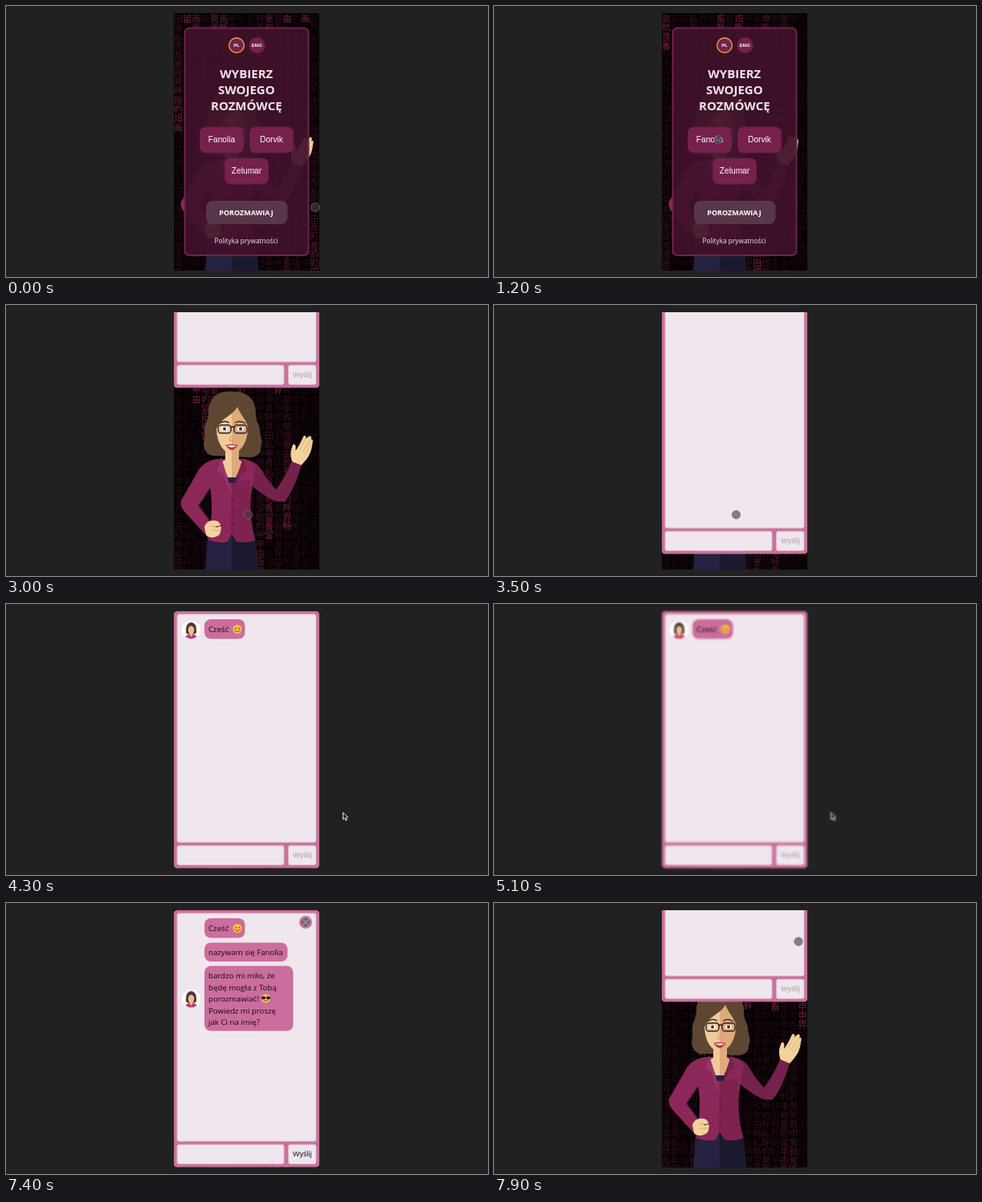
Recreate the animation shown at these times as an HTML page with a canvas. Size 600 by 338 pixels, loop 8000 ms.

```html
<!DOCTYPE html>
<html lang="pl">
<head>
<meta charset="utf-8">
<style>
  html, body { margin: 0; width: 100%; height: 100%; overflow: hidden; background: #222122; }
  canvas { display: block; width: 600px; height: 338px; }
</style>
</head>
<body>
<canvas id="stage"></canvas>
<script>
const LOOP = 8000, STEP = 100;
const canvas = document.getElementById('stage');
const c = canvas.getContext('2d');
const dpr = Math.max(1, window.devicePixelRatio || 1);
canvas.width = 600 * dpr;
canvas.height = 338 * dpr;

const COMIC = '"Open Sans", sans-serif';
const ARIAL = '"Liberation Sans", Arial, sans-serif';
const NAMES = ['Fanolia', 'Dorvik', 'Zelumar'];
const GLYPHS = [...'田由甲申电男甸町画畀畃畅畆畈畉畋界畍畎畏畑畔留畜畝畢略番'];

const clamp = x => Math.min(1, Math.max(0, x));
const mod = (a, n) => ((a % n) + n) % n;
const ramp = (t, from, length) => clamp((t - from) / length);
const smooth = p => p * p * (3 - 2 * p);

// Equivalent of the CSS "ease" timing curve
function ease(x) {
  let lo = 0, hi = 1;
  for (let i = 0; i < 24; i++) {
    const u = (lo + hi) / 2;
    if (.75 * u * (1 - u) + u ** 3 < x) lo = u; else hi = u;
  }
  return .3 * lo * (1 - lo) ** 2 + 3 * lo * lo * (1 - lo) + lo ** 3;
}

// Keys are [time, ...values]
function track(keys, t) {
  let i = 0;
  while (i < keys.length - 2 && t >= keys[i + 1][0]) i++;
  const [t0, ...a] = keys[i], [t1, ...b] = keys[i + 1];
  const p = smooth(ramp(t, t0, t1 - t0));
  return a.map((v, k) => v + (b[k] - v) * p);
}

function paint(fill, stroke, width = 1) {
  if (fill) { c.fillStyle = fill; c.fill(); }
  if (stroke) { c.strokeStyle = stroke; c.lineWidth = width; c.stroke(); }
}
function box(x0, y0, x1, y1, r, fill, stroke, width) {
  c.beginPath();
  c.roundRect(x0, y0, x1 - x0, y1 - y0, r);
  paint(fill, stroke, width);
}
function oval(x, y, rx, ry, fill, stroke, width) {
  c.beginPath();
  c.ellipse(x, y, rx, ry, 0, 0, 7);
  paint(fill, stroke, width);
}
function shape(d, fill, stroke, width) {
  const p = new Path2D(d);
  if (fill) { c.fillStyle = fill; c.fill(p); }
  if (stroke) { c.strokeStyle = stroke; c.lineWidth = width || 1; c.stroke(p); }
}
function label(text, x, y, font, color, align = 'center') {
  c.font = font;
  c.textAlign = align;
  c.fillStyle = color;
  c.fillText(text, x, y);
}

// Rain columns: [start row, rows per pass]
const RAIN = [[12, 33], [0, 58], [1, 52], [25, 36], [1, 48], [2, 61], [20, 43], [39, 44],
  [25, 47], [12, 40], [4, 40], [16, 34], [0, 37], [42, 55], [0, 62], [30, 88]];
function drawRain(t) {
  c.fillStyle = '#020001';
  c.fillRect(209, 9, 181, 321);
  c.fillStyle = '#a62b5e';
  c.font = '11px "Noto Sans CJK SC", "Noto Sans CJK JP", "Noto Sans CJK", sans-serif';
  c.textAlign = 'center';
  RAIN.forEach(([start, span], col) => {
    const head = start + Math.floor(t / 50);
    for (let row = 0; row < 29; row++) {
      const age = mod(head - row, span), pass = Math.floor((head - row) / span);
      const seed = Math.sin(col * 12.9 + row * 78.2 + pass * 37.7) * 43758.5;
      c.globalAlpha = .16 + .6 * .91 ** age;
      c.fillText(GLYPHS[Math.floor(mod(seed, 1) * GLYPHS.length)], 214.5 + col * 11.3, 20 + row * 11.3);
    }
  });
  c.globalAlpha = 1;
}

function drawWoman(t) {
  const skin = '#f2c99b', shade = '#dfaa79', hair = '#5d4733', coat = '#8c2859', dark = '#74224c';
  // Hair and skirt
  shape('M281 108C262 106 252 118 252 134C252 144 246 149 247 160C248 167 245 172 247 179C249 186 256 189 263 188L303 190C312 190 318 185 317 177C321 170 316 164 316 157C316 149 310 145 311 134C311 117 299 107 281 108Z', hair);
  shape('M251 284L310 284L314 331L248 331Z', '#252141');
  shape('M281 284L310 284L314 331L281 331Z', '#1b1930');
  // Waving arm
  c.save();
  c.translate(343, 243);
  c.rotate(-.026 * (1 - Math.cos(t / (7900 / 3) * 2 * Math.PI)));
  c.translate(-343, -243);
  shape('M358 199C353 187 355 181 358 174C361 173 362 176 361 182C364 178 368 171 371 164C373 162 375 164 374 167L378 164C380 163 382 165 380 168C383 167 383 170 382 173C381 185 376 192 367 201Z', '#f3d29c');
  shape('M366 181L374 167M369 184L380 168M372 187L382 173', null, '#d9ac76', .8);
  shape('M356 195L368 200C363 218 354 238 346 246L329 238C340 227 349 212 356 195Z', dark);
  c.restore();
  shape('M302 194C312 195 318 204 324 216L339 234L347 244C341 247 334 245 328 241C316 235 307 226 301 221Z', dark);
  // Body and the arm on the hip
  shape('M263 192C250 194 242 200 237 211L218 244C216 249 220 256 226 262L248 286L258 276L239 250L254 228C257 246 257 264 252 293C262 297 272 297 276 295L281 285L287 295C294 297 303 296 310 293C304 270 303 250 306 229L311 202C306 195 301 193 297 192Z', coat);
  shape('M281 222L304 218C303 250 304 273 310 293C303 296 294 297 287 295L281 285Z', '#7f2250');
  shape('M254 228L240 250L254 270M306 229L303 248', null, '#701d48', 1);
  shape('M247 277C249 269 257 267 264 270C269 274 268 281 266 286C261 291 252 291 249 287Z', '#f3d29c');
  shape('M255 276L265 276M256 281L266 281', null, '#d2a06c', .8);
  // Neck, blouse and lapels
  shape('M273 210L289 210L286 222L276 222Z', '#242142');
  shape('M273 179L290 179L290 193L294 196L286 215L276 215L268 196L273 193Z', skin);
  shape('M281 184L290 179L290 193L294 196L286 215L281 215Z', shade);
  shape('M268 190L263 207L270 210L281 238L276 216Z', '#9c3567');
  shape('M295 190L300 207L293 210L281 238L287 216Z', dark);
  shape('M281 238L281 286M261 277L273 274M290 274L303 277', null, '#701d48', 1);
  for (const y of [244, 258, 273]) oval(282, y, 1.2, 1.2, '#551536');
  // Face
  shape('M281 121C267 123 261 138 262 156C263 173 270 182 281 188Z', skin);
  shape('M281 121C295 123 302 138 301 156C300 173 292 182 281 188Z', shade);
  shape('M288 127C281 140 266 140 261 158C253 150 251 131 260 119C270 108 292 108 302 119C309 130 310 148 302 157C301 144 292 138 288 127Z', hair);
  shape('M265 148Q272 143 278 147M285 147Q292 143 298 148', null, '#3e2921', 1.3);
  for (const x of [272, 292]) {
    oval(x, 154.5, 4.3, 2.2, '#fff');
    oval(x, 154.5, 1.9, 2.1, '#2d2943');
    box(x - 8, 149.8, x + 8, 159.8, 3.5, null, '#282128', 1.4);
  }
  shape('M279 153Q282 151 285 153', null, '#282128', 1.4);
  shape('M280 163L278 169L283 170', null, '#c58d62', .9);
  shape('M273.5 174.5Q281 173 288.5 174.5Q285 181 281 181Q277 181 273.5 174.5Z', '#bd3446');
  shape('M275 175.5Q281 175 287 175.5Q281 179.5 275 175.5Z', '#fff');
}

function drawPanel(t) {
  const alpha = 1 - ramp(t, 2700, 250);
  if (!alpha) return;
  c.globalAlpha = alpha;
  box(222.5, 27.5, 376.5, 311, 6, 'rgba(64,18,43,.93)', '#70214a', 2);
  oval(287, 49, 9.3, 9.3, '#72214b', '#e5a23c', 1.4);
  oval(312.5, 49, 10, 10, '#72214b');
  label('PL', 287, 51.3, 'bold 6px ' + ARIAL, '#fff');
  label('ENG', 312.3, 51.3, 'bold 6px ' + ARIAL, '#fff');
  ['WYBIERZ', 'SWOJEGO', 'ROZMÓWCĘ'].forEach((word, i) =>
    label(word, 299.3, 90.3 + i * 19.7, 'bold 15px ' + COMIC, '#f3e4ed'));

  const chosen = ramp(t, 1350, 200);
  [[268.5, 167], [330.5, 167], [299.5, 206]].forEach(([x, y], i) => {
    box(x - 27, y - 16, x + 27, y + 16, 7, '#76214b', '#66204a', 1);
    if (!i && chosen) {
      c.globalAlpha = alpha * chosen;
      box(x - 27, y - 16, x + 27, y + 16, 7, '#ed9929');
      c.globalAlpha = alpha;
    }
    label(NAMES[i], x, y + 3.3, '10.2px ' + ARIAL, '#fff');
  });

  box(249, 243, 350.5, 272, 8, '#58374a');
  c.globalAlpha = alpha * chosen;
  box(249, 243, 350.5, 272, 8, '#d33a66');
  c.globalAlpha = alpha;
  label('POROZMAWIAJ', 299, 261.3, 'bold 9px ' + COMIC, '#fff');
  label('Polityka prywatności', 299, 296, '500 8.3px ' + COMIC, '#f3e4ed');
  c.globalAlpha = 1;
}

function avatar(y) {
  oval(230.5, y, 11.5, 11.5, '#fff');
  oval(230.5, y - 2, 6.3, 7.5, '#4b382e');
  box(224, y - 2, 237, y + 5, 3, '#4b382e');
  shape(`M223 ${y + 8}Q230.5 ${y + 2} 238 ${y + 8}Q230.5 ${y + 14} 223 ${y + 8}Z`, '#c43a72');
  oval(230.5, y, 3.7, 5.3, '#e9bd91');
  shape(`M228 ${y + 4}L233 ${y + 4}L230.5 ${y + 9}Z`, '#e9bd91');
}
function emoji(x, y, shades) {
  oval(x, y, 5.5, 5.5, '#f8c63f');
  shape(`M${x - 3} ${y + 1.5}Q${x} ${y + 5} ${x + 3} ${y + 1.5}`, null, '#7a3f1d', 1);
  if (shades) {
    box(x - 5.5, y - 2.5, x - .4, y + 1, 1.5, '#25202a');
    box(x + .4, y - 2.5, x + 5.5, y + 1, 1.5, '#25202a');
    return;
  }
  oval(x - 2, y - 1, .8, 1, '#6a3a1c');
  oval(x + 2, y - 1, .8, 1, '#6a3a1c');
  oval(x - 3.6, y + 1.2, 1.3, 1, '#f08b54');
  oval(x + 3.6, y + 1.2, 1.3, 1, '#f08b54');
}
function bubble(x1, y0, y1, lines) {
  box(247, y0, x1, y1, 8, '#cb6d9d');
  lines.forEach((line, i) => label(line, 252, y0 + 15.6 + i * 14.5, '500 9.7px ' + COMIC, '#17090f', 'left'));
}

function drawChat(t) {
  const shown = t < 7527 ? ease(ramp(t, 2800, 1000)) : 1 - ease(ramp(t, 7527, 1000));
  if (!shown) return;
  const ready = t >= 5250, active = ready && t < 7450;
  c.save();
  c.translate(0, -321 * (1 - shown));
  box(209, 9, 390, 329.5, 4, '#ca709c');
  const pane = (x0, y0, x1, y1) => box(x0, y0, x1, y1, 2.5, '#f0e6ed', '#dcb4ca', 1);
  pane(213, 12.8, 386, 297.2);
  pane(213, 301.2, 346, 325.5);
  pane(351.5, 301.2, 386, 325.5);
  label('Wyślij', 368.7, 316.4, '9px ' + ARIAL, active ? '#151115' : '#a39ba0');
  if (t >= 4300) {
    avatar(ready ? 119.5 : 32.5);
    bubble(297.5, 19, 43.5, ['Cześć']);
    emoji(288, 31.5);
  }
  if (ready) {
    bubble(350.5, 49.5, 73, ['nazywam się ' + NAMES[0]]);
    bubble(357.5, 78.5, 159.5, ['bardzo mi miło, że', 'będę mogła z Tobą', 'porozmawiać!', 'Powiedz mi proszę', 'jak Ci na imię?']);
    emoji(323.5, 119, true);
    oval(373, 24, 7.8, 7.8, '#ca6f9d', '#d794b6', 1);
    shape('M369.3 20.3L376.7 27.7M376.7 20.3L369.3 27.7', null, '#fff', 2.4);
  }
  c.restore();
}

const POINTER = [[0, 385, 251], [200, 385, 251], [1100, 279, 167], [1600, 279, 167], [2350, 301.5, 261.5],
  [3650, 301.5, 261.5], [4300, 421, 265], [5500, 421, 265], [6000, 406, 169], [6200, 406, 169],
  [6900, 373, 24], [7500, 373, 24], [7850, 379, 48], [8000, 379, 48]];
function drawPointer(t) {
  const [x, y] = track(POINTER, t);
  if (x < 392) {
    oval(x, y, 5.2, 5.2, 'rgba(60,58,60,.6)', 'rgba(125,118,122,.75)', 1);
    return;
  }
  c.save();
  c.translate(x - 1.5, y - 5);
  shape('M0 0L0 8.5L2 6.8L3.4 10L5 9.3L3.6 6.2L6 6Z', '#111', '#eee', 1);
  c.restore();
}

const BLUR = [[4900, 0], [5100, 1.2], [5200, 5], [5300, 5], [5400, 1.4], [5500, 0]];

function draw(t) {
  c.setTransform(dpr, 0, 0, dpr, 0, 0);
  c.fillStyle = '#222122';
  c.fillRect(0, 0, 600, 338);
  c.save();
  c.beginPath();
  c.rect(209, 9, 181, 321);
  c.clip();
  drawRain(t);
  drawWoman(t);
  drawPanel(t);
  drawChat(t);
  c.restore();
  drawPointer(t);
  const [blur] = track(BLUR, t);
  canvas.style.filter = blur ? `blur(${blur}px)` : 'none';
}

const begin = performance.now();
let last = -1;
function tick() {
  const t = Math.floor((performance.now() - begin) % LOOP / STEP) * STEP;
  if (t !== last) draw(last = t);
  requestAnimationFrame(tick);
}
tick();
</script>
</body>
</html>
```
